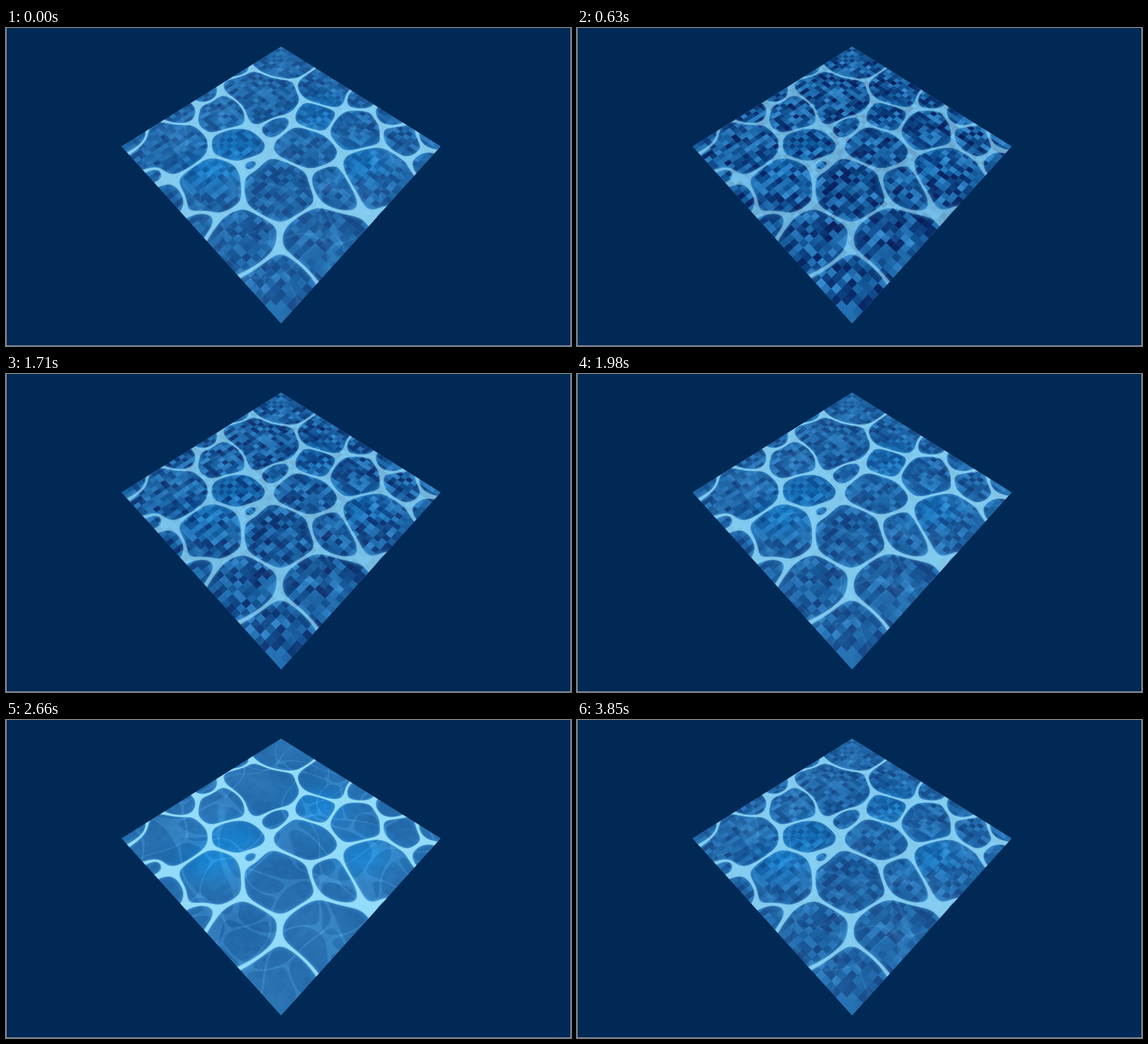
An HTML page with a canvas that plays this animation: 855 by 481 pixels, repeating every 3870 ms.

```html
<!DOCTYPE html>
<html>
<head>
<meta charset="utf-8">
<title>Pool</title>
<style>
html, body { margin: 0; width: 100%; height: 100%; overflow: hidden; background: #002955; }
canvas { display: block; }
</style>
</head>
<body>
<canvas id="stage" width="855" height="481"></canvas>
<script>
const W = 855, H = 481, LOOP = 3870, TILES = 40;
const TILT = .2183, CENTER = 416.3, TOP = 28, SPREAD = 188.8, RISE = 111.93;
const stage = document.getElementById('stage').getContext('2d');

// Cells of the light web: centre on the stage, radius on the pool floor.
const cells = [
  [418,56,17], [482,92,17], [387,104,25], [335,128,17], [350,66,4], [308,101,5],
  [262,134,8], [250,180,20], [200,165,6], [348,177,14], [410,145,9], [467,134,13],
  [530,110,7], [530,156,16], [580,133,7], [598,169,11], [638,170,5], [633,203,6],
  [560,222,20], [452,182,17], [497,238,14], [412,244,21], [312,240,19], [370,207,5],
  [228,221,5], [250,258,9], [292,294,8], [365,315,17], [478,325,20], [412,390,17],
  [583,285,3]
];
const glows = [[305, 215], [475, 130], [350, 178], [540, 205]];

function seeded(seed) {
  return () => {
    seed = seed + 0x6D2B79F5 | 0;
    let t = Math.imul(seed ^ seed >>> 15, 1 | seed);
    t ^= t + Math.imul(t ^ t >>> 7, 61 | t);
    return ((t ^ t >>> 14) >>> 0) / 4294967296;
  };
}

// Pool floor: a runs across, b runs from the far corner (0) to the near one (200).
function toStage(a, b) {
  const depth = 1 - TILT * b / 100;
  return [CENTER + SPREAD * a / 100 / depth, (TOP + RISE * b / 100) / depth];
}

function toFloor(x, y) {
  const b = (y - TOP) / (RISE + TILT * y);
  return [100 * (x - CENTER) * (1 - TILT * b) / SPREAD, 100 * b];
}

function layer() {
  const canvas = document.createElement('canvas');
  canvas.width = W;
  canvas.height = H;
  return canvas.getContext('2d');
}

function square(ctx, u, v, size) {
  ctx.beginPath();
  for (const [i, j] of [[0, 0], [1, 0], [1, 1], [0, 1]]) {
    const p = u + i * size, q = v + j * size;
    ctx.lineTo(...toStage(100 * (p - q), 100 * (p + q)));
  }
  ctx.closePath();
}

// Soft Voronoi: near 0 inside a cell, high on borders and higher where three meet.
function web(sites, a, b, softness) {
  let total = 0, best = 0;
  for (const [sa, sb, r] of sites) {
    const weight = Math.exp((r - Math.hypot(a - sa, b - sb)) / softness);
    total += weight;
    if (weight > best) best = weight;
  }
  return 1 - best / total;
}

function smoothstep(from, to, x) {
  const t = Math.max(0, Math.min(1, (x - from) / (to - from)));
  return t * t * (3 - 2 * t);
}

// Colours every floor pixel, then trims the result to the pool's outline.
function paint(shade) {
  const raw = layer(), image = raw.createImageData(W, H), ctx = layer();
  for (let y = 26; y < 450; y++)
    for (let x = 172; x < 661; x++) {
      const [a, b] = toFloor(x + .5, y + .5);
      if (Math.abs(a) + Math.abs(b - 100) < 103)
        image.data.set(shade(a, b, x, y), 4 * (y * W + x));
    }
  raw.putImageData(image, 0, 0);
  square(ctx, 0, 0, 1);
  ctx.clip();
  ctx.drawImage(raw.canvas, 0, 0);
  return ctx.canvas;
}

function scatter(count, seed) {
  const random = seeded(seed);
  return Array.from({ length: count }, () => [random() * 220 - 110, random() * 220 - 10, random() * 12]);
}

function makeWater() {
  const ripples = [scatter(50, 4), scatter(40, 9)];
  return paint((a, b, x, y) => {
    const wa = a + 4 * Math.sin(b / 9), wb = b + 4 * Math.sin(a / 8);
    let glow = 0, ripple = 0;
    for (const [gx, gy] of glows) glow += Math.exp(-((x - gx) ** 2 + 2 * (y - gy) ** 2) / 1800);
    for (const sites of ripples) ripple += .3 * smoothstep(.36, .46, web(sites, wa, wb, 2.2));
    const cloud = Math.sin(a / 13 + Math.sin(b / 17)) * Math.sin(b / 12 + 1);
    const light = 7 * cloud + 60 * ripple;
    return [40 - 14 * glow + light * .8, 112 + 18 * glow + light, 176 + 30 * glow + light, 255];
  });
}

function makeCaustics() {
  const sites = cells.map(([x, y, r]) => [...toFloor(x, y), r]);
  return paint((a, b) => {
    const edge = web(sites, a + Math.sin(b / 6), b + Math.sin(a / 7), 4);
    const core = smoothstep(.35, .45, edge);
    return [85 + 65 * core, 175 + 47 * core, 235 + 17 * core, 255 * (.2 * smoothstep(.2, .36, edge) + .8 * core)];
  });
}

function makeTiles() {
  const ctx = layer(), random = seeded(71);
  square(ctx, 0, 0, 1);
  ctx.clip();
  for (let i = 0; i < TILES; i++)
    for (let j = 0; j < TILES; j++) {
      const k = random();
      ctx.fillStyle = `rgba(${58 * k * k},${12 + 132 * k},${72 + 142 * k},.88)`;
      square(ctx, i / TILES, j / TILES, 1 / TILES);
      ctx.fill();
    }
  return ctx.canvas;
}

const water = makeWater(), tiles = makeTiles(), caustics = makeCaustics();

function draw(time) {
  const cover = .5 + .5 * Math.cos(2 * Math.PI * (time - 1030) / LOOP);
  stage.globalAlpha = 1;
  stage.fillStyle = '#8f9aa8';
  stage.fillRect(0, 0, W, H);
  stage.fillStyle = '#002955';
  stage.fillRect(1, 0, W - 2, H - 1);
  stage.drawImage(water, 0, 0);
  stage.globalAlpha = cover;
  stage.drawImage(tiles, 0, 0);
  stage.globalAlpha = 1 - .36 * cover;
  stage.drawImage(caustics, 0, 0);
}

const start = performance.now();
function tick() {
  draw(performance.now() - start);
  requestAnimationFrame(tick);
}
tick();
</script>
</body>
</html>
```
